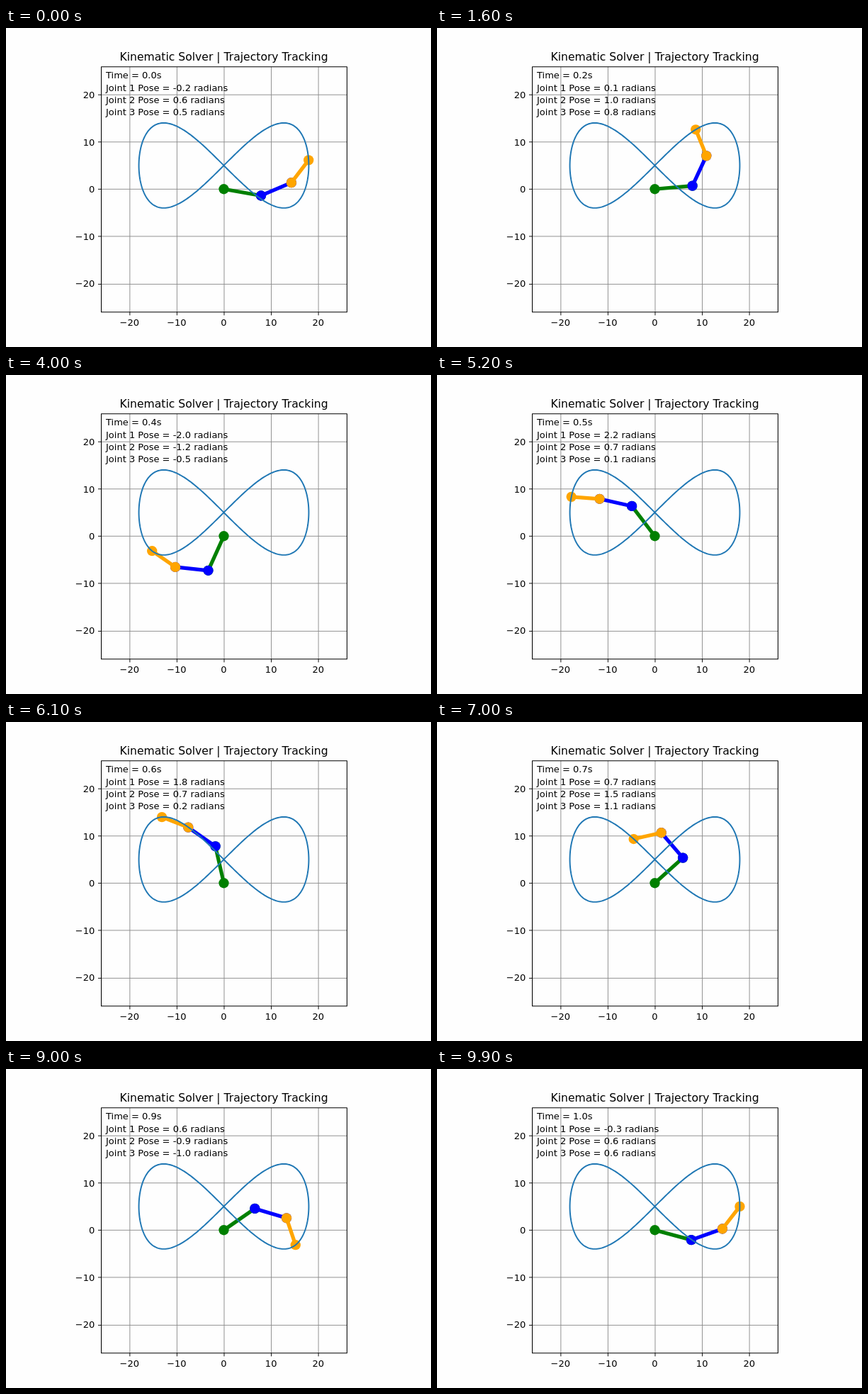
An HTML page with a canvas for the animation above (10 s loop, 600 px wide and 450 px high).

```html
<!DOCTYPE html>
<html lang="en">
<head>
<meta charset="utf-8">
<title>Kinematic Solver</title>
<style>
  html, body { margin: 0; width: 100%; height: 100%; overflow: hidden; background: #fefefe; }
  canvas { display: block; width: 600px; height: 450px; }
</style>
</head>
<body>
<canvas id="stage" width="600" height="450"></canvas>
<script>
const ctx = document.getElementById('stage').getContext('2d');

const STEPS = 100, STEP_MS = 100;
const LINKS = [8, 7, 6];
const COLORS = ['#008000', '#0000ff', '#ffa500'];
const SCALE = 0.9375;              // plot is laid out on 640 x 480
const PT = 100 / 72 * SCALE;       // one point in pixels
const UNIT = 346.5 / 52;
const FONT = '"DejaVu Sans", Verdana, sans-serif';

const px = x => 307.5 + x * UNIT;
const py = y => 227.25 - y * UNIT;
const snap = v => (Math.floor(v / SCALE + 0.5) + 0.5) * SCALE;

function goal(t) {
  return [18 * Math.cos(2 * Math.PI * t), 5 + 9 * Math.sin(4 * Math.PI * t)];
}

// Base, two joints and tip for relative joint angles
function forward(q) {
  const pts = [[0, 0]];
  let a = 0, x = 0, y = 0;
  for (let i = 0; i < 3; i++) {
    a += q[i];
    x += LINKS[i] * Math.cos(a);
    y += LINKS[i] * Math.sin(a);
    pts.push([x, y]);
  }
  return pts;
}

// Gradient descent on the tip error, from the straight arm
function solve([gx, gy]) {
  const q = [0, 0, 0], rate = 0.0005;
  for (let n = 0; n < 6000; n++) {
    const pts = forward(q), [x, y] = pts[3];
    const ex = gx - x, ey = gy - y;
    if (ex * ex + ey * ey < 1e-8) break;
    for (let i = 0; i < 3; i++) {
      q[i] += rate * ((x - pts[i][0]) * ey - (y - pts[i][1]) * ex);
    }
  }
  return q;
}

const poses = Array.from({ length: STEPS }, (_, k) => solve(goal((k + 1) / STEPS)));

function line(x1, y1, x2, y2, width, color) {
  ctx.lineWidth = width;
  ctx.strokeStyle = color;
  ctx.beginPath();
  ctx.moveTo(x1, y1);
  ctx.lineTo(x2, y2);
  ctx.stroke();
}

function dot([x, y], color) {
  ctx.fillStyle = color;
  ctx.beginPath();
  ctx.arc(px(x), py(y), 5.5 * PT, 0, 2 * Math.PI);
  ctx.fill();
}

function text(str, x, y, size, align) {
  ctx.font = size * PT + 'px ' + FONT;
  ctx.textAlign = align;
  ctx.fillStyle = '#000';
  ctx.fillText(str, x, y);
}

function drawAxes() {
  const left = snap(px(-26)), right = snap(px(26));
  const top = snap(py(26)), bottom = snap(py(-26));
  const tick = 3.5 * PT;
  for (let v = -20; v <= 20; v += 10) {
    const x = snap(px(v)), y = snap(py(v));
    const label = String(v).replace('-', '\u2212');
    line(x, top, x, bottom, SCALE, '#8c8c8c');
    line(left, y, right, y, SCALE, '#8c8c8c');
    line(x, bottom, x, bottom + tick, SCALE, '#000');
    line(left - tick, y, left, y, SCALE, '#000');
    text(label, px(v), 419.7, 10, 'center');
    text(label, 125.2, py(v) + 4.9, 10, 'right');
  }
  return () => {
    ctx.lineWidth = 0.8 * PT;
    ctx.strokeStyle = '#000';
    ctx.strokeRect(left, top, right - left, bottom - top);
  };
}

function drawPath() {
  ctx.lineWidth = 1.5 * PT;
  ctx.strokeStyle = '#1f77b4';
  ctx.lineJoin = 'round';
  ctx.beginPath();
  for (let i = 0; i < 300; i++) {
    const [x, y] = goal(i / 300);
    ctx.lineTo(px(x), py(y));
  }
  ctx.closePath();
  ctx.stroke();
}

function drawArm(q) {
  const pts = forward(q);
  COLORS.forEach((color, i) => {
    const a = pts[i], b = pts[i + 1];
    line(px(a[0]), py(a[1]), px(b[0]), py(b[1]), 4 * PT, color);
    dot(a, color);
    dot(b, color);
  });
}

function draw(k) {
  const t = (k + 1) / STEPS, q = poses[k];
  ctx.fillStyle = '#fefefe';
  ctx.fillRect(0, 0, 600, 450);
  const drawFrame = drawAxes();
  drawArm(q);
  drawPath();
  drawFrame();
  text('Kinematic Solver | Trajectory Tracking', 307.5, 46, 12, 'center');
  const clock = t === 0.25 ? '0.2' : t.toFixed(1);   // ties round to even
  const rows = [`Time = ${clock}s`,
    ...q.map((a, i) => `Joint ${i + 1} Pose = ${a.toFixed(1)} radians`)];
  rows.forEach((row, i) => text(row, 141, py(23.4 - 2.6 * i), 10, 'left'));
}

const start = performance.now();
let last = -1;
function tick(now) {
  const k = Math.floor(Math.max(0, now - start) / STEP_MS) % STEPS;
  if (k !== last) draw(last = k);
  requestAnimationFrame(tick);
}
draw(0);
requestAnimationFrame(tick);
</script>
</body>
</html>
```
